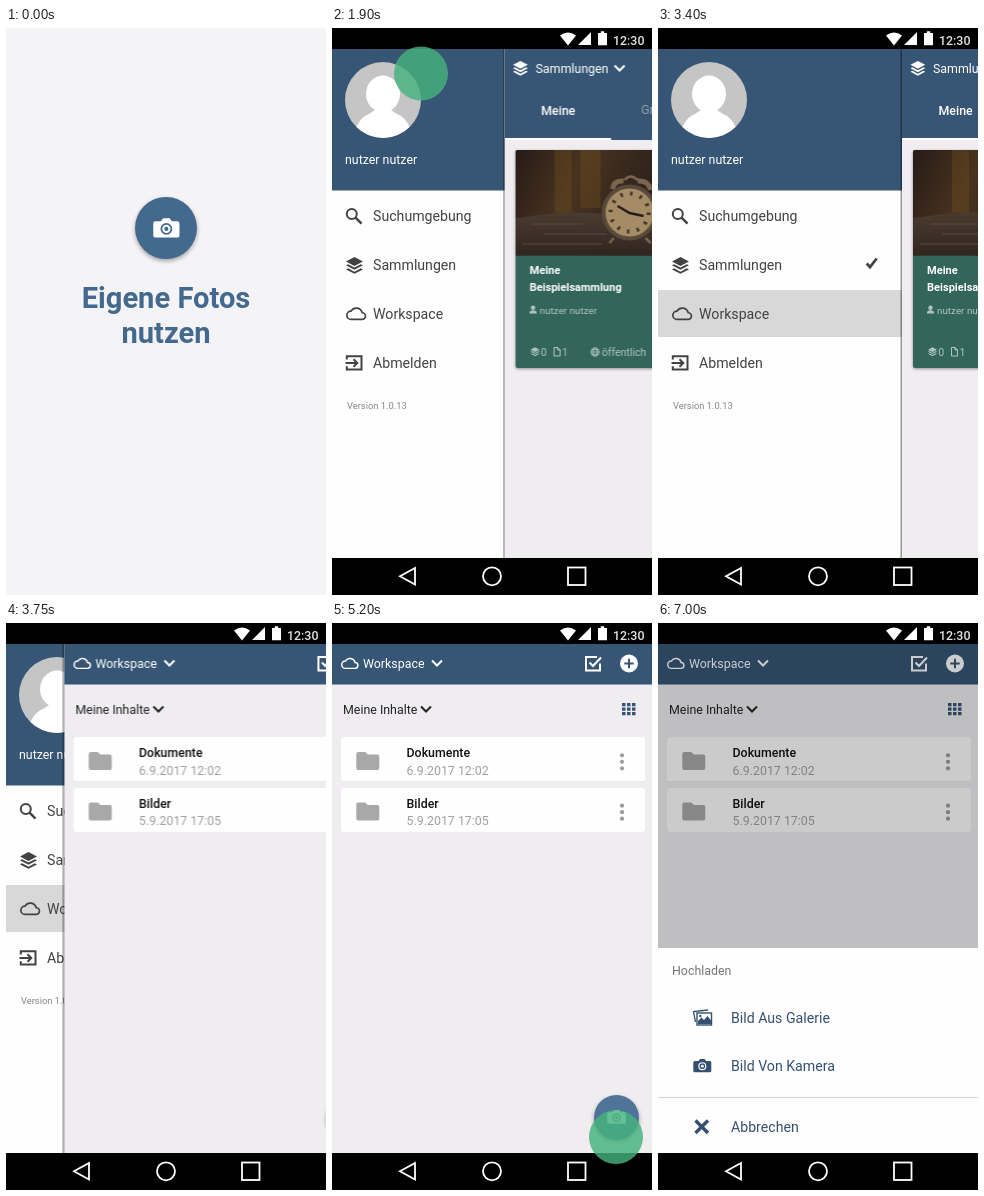
Recreate the animation shown at these times as an HTML page. Size 320x567 px, loop 7.05 s.

```html
<!DOCTYPE html>
<html lang="de">
<head>
<meta charset="utf-8">
<title>Eigene Fotos nutzen</title>
<style>
html, body { margin: 0; width: 100%; height: 100%; overflow: hidden; background: #f4f3f5; }
svg { display: block; }
#stage { position: fixed; left: 0; top: 0; width: 320px; height: 567px; }
text { font-family: Roboto, "Noto Sans", sans-serif; font-size: 12.4px; fill: currentColor; }
.fill { fill: currentColor; }
.line { fill: none; stroke: currentColor; }
.big { font-size: 14.15px; }
.med { font-weight: 500; }
.head { font-size: 29.1px; font-weight: 700; text-anchor: middle; }
.name { font-size: 11.05px; font-weight: 700; }
.user { font-size: 9.85px; }
.meta { font-size: 10.5px; }
.faint { color: rgba(255, 255, 255, .62); }
.soft { filter: drop-shadow(0 2px 2px rgba(0, 0, 0, .35)); }
.card { filter: drop-shadow(0 1px 1.5px rgba(0, 0, 0, .4)); }
.row { filter: drop-shadow(0 .5px .7px rgba(0, 0, 0, .18)); }

/* 7050 ms timeline: cut 1500, drawer opens 1755, closes 3550, sheet rises 5250 */
#intro, #page, #collections, #workspace, #mark, #shade, #sheet, .tap {
  animation: 7050ms linear infinite both;
}
#intro { animation-name: intro; animation-timing-function: step-end; }
#page { animation-name: slide; }
#collections { animation-name: leave; animation-timing-function: step-end; }
#workspace { animation-name: enter; animation-timing-function: step-end; }
#mark { animation-name: mark; animation-timing-function: step-end; }
#shade { animation-name: shade; }
#sheet { animation-name: rise; }
.tap {
  fill: #45b27e; opacity: 0; animation-name: tap; animation-fill-mode: none;
  transform-box: fill-box; transform-origin: center;
}
@keyframes intro { 0% { opacity: 1; } 21.277%, 100% { opacity: 0; } }
@keyframes slide {
  0%, 24.894% { transform: translateX(0); animation-timing-function: ease-out; }
  28.865%, 50.355% { transform: translateX(244px); animation-timing-function: ease-out; }
  55.319%, 100% { transform: translateX(0); }
}
@keyframes leave { 0% { opacity: 1; } 50.355%, 100% { opacity: 0; } }
@keyframes enter { 0% { opacity: 0; } 50.355%, 100% { opacity: 1; } }
@keyframes mark { 0% { opacity: 0; } 44.681% { opacity: 1; } 55.319%, 100% { opacity: 0; } }
@keyframes shade { 0%, 74.468% { opacity: 0; } 78.014%, 100% { opacity: .2; } }
@keyframes rise {
  0%, 74.468% { transform: translateY(210px); animation-timing-function: ease-out; }
  78.014%, 100% { transform: translateY(0); }
}
@keyframes tap {
  0% { opacity: 0; transform: scale(.6); }
  1.42%, 4.26% { opacity: .82; transform: scale(1); }
  6.38%, 100% { opacity: 0; transform: scale(1); }
}
</style>
</head>
<body>
<svg id="stage" viewBox="0 0 320 567">
  <defs>
    <g id="layers" class="fill">
      <path d="M8 0 16 4.2 8 8.4 0 4.2z"/>
      <path id="fold" d="M2 6.8 8 10 14 6.8 16 7.9 8 12.1 0 7.9z"/>
      <use href="#fold" y="3.8"/>
    </g>
    <path id="cloud" class="line" stroke-width="2" d="M6 19h13a4 4 0 0 0 .3-8A7.3 7.3 0 0 0 6 9a5 5 0 0 0 0 10z"/>
    <path id="down" class="line" stroke-width="2" d="M0 0 5 5 10 0"/>
    <g id="camera">
      <path class="fill" d="M2 3H7L9 .3H15L17 3H22a2 2 0 0 1 2 2V16a2 2 0 0 1-2 2H2a2 2 0 0 1-2-2V5A2 2 0 0 1 2 3z"/>
      <circle cx="12" cy="10" r="4.6" fill="none" stroke="var(--bg)" stroke-width="1.6"/>
      <circle cx="12" cy="10" r="1.9" fill="var(--bg)"/>
    </g>
    <path id="folder" fill="#a8a8a8" d="M2 0H9L11.500 2.400H21a2 2 0 0 1 2 2V16a2 2 0 0 1-2 2H2a2 2 0 0 1-2-2V2A2 2 0 0 1 2 0z"/>
    <g id="more" fill="#9c9c9c">
      <circle r="2.1" cy="-6.500"/><circle r="2.1"/><circle r="2.1" cy="6.500"/>
    </g>
    <g id="plus">
      <circle cx="297" cy="40.500" r="9" fill="#fff"/>
      <path d="M292.300 40.500h9.400M297 35.800v9.400" stroke="#375675" stroke-width="2"/>
    </g>
    <g id="person" class="fill">
      <circle cx="3.500" cy="2.300" r="2.200"/><path d="M0 8V6.500Q.5 5 3.500 4.800 6.500 5 7 6.500V8z"/>
    </g>
    <g id="counts">
      <use href="#person" x="25" y="277.500"/>
      <text class="user" x="35" y="285.500">nutzer nutzer</text>
      <use href="#layers" transform="translate(26 319.300) scale(.56)"/>
      <path class="line" d="M49.500 319.500h3.500l2.500 2.500v6h-6zM53 319.500v2.500h2.500"/>
    </g>
    <linearGradient id="dusk" x2="1" y2=".3">
      <stop offset="0" stop-color="#271b17"/><stop offset=".45" stop-color="#49331f"/><stop offset="1" stop-color="#2c211c"/>
    </linearGradient>
    <linearGradient id="table" x2="0" y2="1">
      <stop offset="0" stop-color="#4b3b30"/><stop offset="1" stop-color="#30251f"/>
    </linearGradient>
    <linearGradient id="leaf" x2="1" y2="1">
      <stop offset="0" stop-color="#8fd045"/><stop offset="1" stop-color="#4b9e25"/>
    </linearGradient>
    <clipPath id="face"><circle cx="51" cy="72" r="38"/></clipPath>
    <clipPath id="photo1"><path d="M11 227.500V124a2 2 0 0 1 2-2H151a2 2 0 0 1 2 2V227.500z"/></clipPath>
    <clipPath id="photo2"><path d="M165.500 227.500V124a2 2 0 0 1 2-2H305.500a2 2 0 0 1 2 2V227.500z"/></clipPath>
  </defs>

  <!-- drawer -->
  <g id="menu" color="#424242">
    <rect width="320" height="567" fill="#fefefe"/>
    <rect y="21" width="320" height="141.500" fill="#375675"/>
    <g clip-path="url(#face)">
      <rect x="13" y="34" width="76" height="76" fill="#c5c5c6"/>
      <path d="M22 112Q23 92 37 86L43 82H59L65 86Q79 92 80 112z" fill="#fff"/>
      <ellipse cx="51" cy="66" rx="17" ry="18.500" fill="#fff"/>
    </g>
    <text x="13" y="136" fill="#fff" color="#fff">nutzer nutzer</text>
    <rect id="mark" y="262" width="244" height="47" fill="#d8d8d8"/>
    <g class="line" stroke-width="2">
      <circle cx="19.800" cy="186" r="5"/>
      <path d="M23.500 189.700 29.500 195.700" stroke-width="2.500"/>
      <path d="M14.800 331.500V328.300H29.500V341.500H14.800V338.300M13.500 335H25M21.500 331.200 25.300 335 21.500 338.800"/>
    </g>
    <use href="#layers" transform="translate(14 229) scale(1.060)"/>
    <use href="#cloud" transform="translate(14 275.500) scale(.84)"/>
    <path class="line" stroke-width="2.800" d="M208.700 235.500 212 239 218.700 230.500"/>
    <g class="big">
      <text class="big" x="41" y="193">Suchumgebung</text>
      <text class="big" x="41" y="242">Sammlungen</text>
      <text class="big" x="41" y="291">Workspace</text>
      <text class="big" x="41" y="339.500">Abmelden</text>
    </g>
    <text x="15" y="381" style="font-size:9.350px" color="#858585">Version 1.0.13</text>
  </g>

  <!-- sliding page -->
  <g id="page">
    <rect x="-1.500" y="21" width="2" height="509" fill="#000" opacity=".4"/>
    <rect y="21" width="320" height="509" fill="#efedf0"/>

    <g id="workspace">
      <rect y="21" width="320" height="40.500" fill="#375675"/>
      <g color="#fff">
        <use href="#cloud" transform="translate(9 31.500) scale(.73)"/>
        <text x="31" y="44.500">Workspace</text>
        <use href="#down" x="100" y="37.500"/>
        <path class="line" stroke-width="2" d="M268 40.500V47.500H254V34H265M257.500 39.500 261 43 269 34.500"/>
      </g>
      <use href="#plus"/>
      <g color="#222">
        <text x="11" y="90.500">Meine Inhalte</text>
        <use href="#down" x="89" y="83.500"/>
      </g>
      <path d="M290 81.700h13.500M290 86.200h13.500M290 90.700h13.500" stroke="#375675" stroke-width="3.300" stroke-dasharray="3.500 1.500"/>
      <g class="row" fill="#fefefe">
        <rect x="9" y="114" width="304" height="44.500" rx="2"/>
        <rect x="9" y="165" width="304" height="44" rx="2"/>
      </g>
      <use href="#folder" x="24.300" y="129"/>
      <use href="#folder" x="24.300" y="179.500"/>
      <use href="#more" x="290" y="138.800"/>
      <use href="#more" x="290" y="189.200"/>
      <g color="#111">
        <text class="med" x="74.500" y="134">Dokumente</text>
        <text class="med" x="74.500" y="184.500">Bilder</text>
      </g>
      <g color="#a0a0a2">
        <text x="74.500" y="151.700">6.9.2017 12:02</text>
        <text x="74.500" y="202.300">5.9.2017 17:05</text>
      </g>
      <g class="soft" color="#fff" style="--bg:#4f7399">
        <circle cx="284.500" cy="494.500" r="22.500" fill="#4f7399"/>
        <use href="#camera" transform="translate(275.300 487) scale(.77)"/>
      </g>
    </g>

    <g id="collections">
      <rect y="21" width="320" height="509" fill="#efedf0"/>
      <rect y="21" width="320" height="91" fill="#375675"/>
      <rect y="110" width="106.500" height="2" fill="#fff"/>
      <g color="#fff">
        <use href="#layers" transform="translate(8.500 33) scale(.92)"/>
        <text x="31" y="44.500">Sammlungen</text>
        <use href="#down" x="110" y="37.500"/>
        <text class="med" x="36.500" y="86.500">Meine</text>
      </g>
      <g color="#8fa0b2">
        <text x="136.500" y="85.500">Gruppen</text>
        <text x="256" y="85.500">Alle</text>
      </g>
      <use href="#plus"/>

      <g class="card">
        <rect x="11" y="122" width="142" height="218" rx="2" fill="#33665a"/>
        <rect x="165.500" y="122" width="142" height="218" rx="2" fill="#71945f"/>
      </g>
      <g clip-path="url(#photo1)">
        <rect x="11" y="122" width="142" height="106" fill="url(#dusk)"/>
        <path d="M50 122h17v62H50zM76 122h20v58H76z" fill="#70501f" opacity=".35"/>
        <path d="M11 190 60 184 153 188V228H11z" fill="url(#table)"/>
        <path d="M28 196h50M40 206h62M18 216h80" stroke="#6a5746" opacity=".35" stroke-width="2"/>
        <g stroke="#7c6650" fill="none">
          <path d="M108 161Q109 152 119 153M133 153Q144 152 146 162" stroke-width="5"/>
          <path d="M120 152Q126 145 133 152M109 210 105 215M141 210 146 215" stroke-width="2.500"/>
          <circle cx="125" cy="184.500" r="26" fill="#a68c66" stroke="#594939" stroke-width="4"/>
          <circle cx="125" cy="184.500" r="19" stroke="#40352a" stroke-width="4" stroke-dasharray="2.500 7.450"/>
          <path d="M113 178 125 185 139 188" stroke="#241d18" stroke-width="2.500"/>
        </g>
      </g>
      <g clip-path="url(#photo2)">
        <rect x="165" y="122" width="144" height="106" fill="#0b130a"/>
        <path d="M165 122H198L203 143 187 157 165 147zM165 178 187 164 202 186 180 214 165 206z" fill="#437d29"/>
        <path d="M274 130 308 142V178L283 165zM263 199 289 176 308 191V218L280 212z" fill="#315f20"/>
        <path d="M217 122H263L273 137 246 146 225 136z" fill="#2c5a1e"/>
        <path d="M220 133 237 154 266 144 262 169 278 184 254 193 247 216 225 205 199 211 205 185 185 169 209 158z" fill="url(#leaf)"/>
        <path d="M239 183 220 133M239 183 266 144M239 183 185 169M239 183 199 211M239 183 247 216M239 183 278 184" fill="none" stroke="#bfe883" stroke-width="1"/>
      </g>
      <g color="#fff">
        <text class="name" x="25" y="245.500">Meine</text>
        <text class="name" x="25" y="263.300">Beispielsammlung</text>
        <text class="name" x="179.700" y="245.500">Private</text>
        <text class="name" x="179.700" y="263.300">Ideensammlung</text>
      </g>
      <g class="faint">
        <use href="#counts"/>
        <use href="#counts" x="154.800"/>
        <text class="meta" x="36.200" y="327.800">0</text>
        <text class="meta" x="57.500" y="327.800">1</text>
        <text class="meta" x="97.300" y="327.800">öffentlich</text>
        <text class="meta" x="191" y="327.800">1</text>
        <text class="meta" x="212.300" y="327.800">4</text>
        <text class="meta" x="251.700" y="327.800">privat</text>
        <g class="line" stroke-width=".8">
          <circle cx="90.500" cy="324" r="4.200"/>
          <ellipse cx="90.500" cy="324" rx="2" ry="4.200"/>
          <path d="M86.300 324h8.400M87 321.800h7M87 326.200h7"/>
        </g>
        <g color="#e9efe5">
          <rect class="fill" x="241" y="323.300" width="8" height="5" rx=".6"/>
          <path class="line" stroke-width="1.300" d="M242.700 323.500v-1.500a2.300 2.300 0 0 1 4.600 0v1.500"/>
        </g>
      </g>
    </g>
  </g>

  <!-- upload sheet -->
  <rect id="shade" y="21" width="320" height="509"/>
  <g id="sheet" color="#34506f" style="--bg:#fefefe">
    <rect y="325" width="320" height="205" fill="#fefefe"/>
    <text x="14" y="352" color="#757577">Hochladen</text>
    <path d="M0 474.500H320" stroke="#d2d3d7"/>
    <path class="line" stroke-width="1.300" d="M37.500 399 35.500 388.500 50 387"/>
    <rect class="line" x="39" y="390" width="14.500" height="12" stroke-width="1.400"/>
    <path class="fill" d="M40 401V398L43.500 394.500 46 397 49.500 393 53 397.500V401z"/>
    <circle class="fill" cx="42.300" cy="393" r="1.200"/>
    <use href="#camera" transform="translate(35.300 435.700) scale(.75)"/>
    <path class="line" stroke-width="3.400" d="M37.500 497.500 50 510M50 497.500 37.500 510"/>
    <text class="big" x="73" y="399.500">Bild Aus Galerie</text>
    <text class="big" x="73" y="447.500">Bild Von Kamera</text>
    <text class="big" x="73" y="508.700">Abbrechen</text>
  </g>

  <!-- system bars -->
  <g color="#fff">
    <rect width="320" height="21"/>
    <rect y="530" width="320" height="37"/>
    <path class="fill" d="M228 7.500Q236 1.500 244 7.500L236 17.500zM259 4V17H246zM266 5h2.800V3.300h3.400V5H275V17.300H266z"/>
    <text x="281" y="17" color="#e4e4e4" class="med">12:30</text>
    <g class="line" stroke-width="1.800">
      <path d="M83 540V556.500L68 548.300z"/>
      <circle cx="160" cy="548.300" r="9"/>
      <rect x="236" y="539.500" width="17.500" height="17.500"/>
    </g>
  </g>

  <circle class="tap" cx="89" cy="45.500" r="27" style="animation-delay:1600ms"/>
  <circle class="tap" cx="100" cy="286" r="27" style="animation-delay:2930ms"/>
  <circle class="tap" cx="284" cy="514" r="27" style="animation-delay:5000ms"/>

  <!-- opening title -->
  <g id="intro" color="#44698e" style="--bg:#44698e">
    <rect width="320" height="567" fill="#f4f3f5"/>
    <circle class="soft" cx="160" cy="200" r="31" fill="#44698e"/>
    <g color="#fff"><use href="#camera" transform="translate(147.300 190) scale(1.090)"/></g>
    <text class="head" x="160" y="280">Eigene Fotos</text>
    <text class="head" x="160" y="315">nutzen</text>
  </g>
</svg>
</body>
</html>
```
